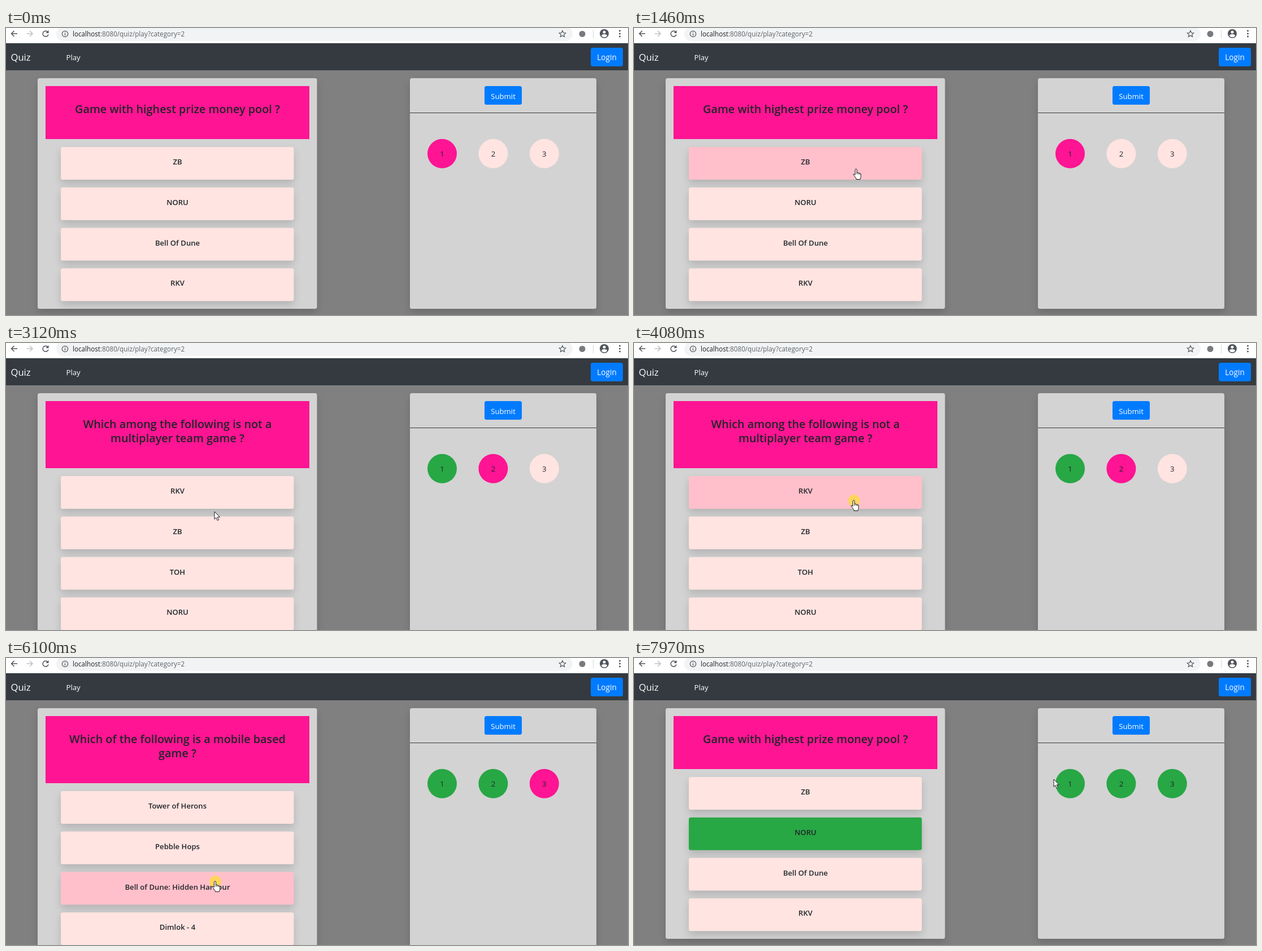
An HTML page that plays this animation: 1101 px wide and 509 px high, repeating every 8000 ms.

```html
<!DOCTYPE html>
<html lang="en">
<head>
<meta charset="utf-8">
<title>Quiz</title>
<style>
  html, body { margin: 0; width: 100%; height: 100%; overflow: hidden; background: #808080; }
  svg { display: block; width: 1101px; height: 509px; font-family: "Open Sans", "Noto Sans", sans-serif; }
  text { fill: #212529; font-size: 13.2px; }
  .mid { text-anchor: middle; }
  .light { fill: #fff; }
  .card { fill: #d3d3d3; }
  .shadow { filter: drop-shadow(0 7px 7px rgba(0, 0, 0, .15)); }
  .title { font-size: 19.8px; font-weight: 600; }
  .label { font-size: 13.1px; font-weight: 600; }
  .url { font-size: 11.7px; fill: #5f6368; }
  .line { fill: none; stroke: #50545a; stroke-width: 1.5; }
  .pointer { fill: #fff; stroke: #1a1a1a; stroke-width: 1; stroke-linejoin: round; }
</style>
</head>
<body>
<svg viewBox="0 0 1101 509">
  <rect width="1101" height="509" fill="#808080"/>

  <!-- browser bar -->
  <rect width="1101" height="27" fill="#fff"/>
  <rect x="89" y="-2" width="914" height="25" rx="12.5" fill="#f1f3f4"/>
  <path class="line" d="M20 10H9.5M14.5 5l-5 5 5 5"/>
  <path class="line" style="stroke:#bdc1c6" d="M36.5 10H47M42 5l5 5-5 5"/>
  <path class="line" d="M74 7A5 5 0 1 0 75 11.5"/>
  <path fill="#50545a" d="M75.5 4v5h-5z"/>
  <g class="line" style="stroke-width:1.2">
    <circle cx="104.5" cy="10.5" r="5.2"/>
    <path d="M104.5 9.8v3.6M104.5 7.4v1.3"/>
    <path d="M985 4.8l1.7 3.7 4 .4-3 2.7.9 4-3.6-2.1-3.6 2.1.9-4-3-2.7 4-.4z"/>
  </g>
  <text class="url" x="118" y="15"><tspan fill="#202124">localhost</tspan>:8080/quiz/play?category=2</text>
  <circle cx="1020" cy="10.5" r="5.5" fill="#777a7e"/>
  <path d="M1039.5 3v15" stroke="#d5d7da"/>
  <circle cx="1059" cy="10" r="8" fill="#50545a"/>
  <circle cx="1059" cy="7.3" r="2.5" fill="#fff"/>
  <path d="M1054 14q0-3 5-3t5 3q-2 2.5-5 2.5t-5-2.5z" fill="#fff"/>
  <g fill="#50545a">
    <circle cx="1086.5" cy="5" r="1.5"/><circle cx="1086.5" cy="10" r="1.5"/><circle cx="1086.5" cy="15" r="1.5"/>
  </g>

  <!-- navigation -->
  <rect y="27" width="1101" height="48" fill="#343a40"/>
  <text class="light" x="8.5" y="57.5" style="font-size:16.6px">Quiz</text>
  <text class="light" x="106.5" y="56.5">Play</text>
  <rect x="1035" y="35" width="57" height="33" rx="3.5" fill="#007bff"/>
  <text class="light mid" x="1063.5" y="56.5" style="font-size:13.6px">Login</text>

  <!-- cards -->
  <rect class="card shadow" x="56" y="89" width="494.5" height="409" rx="3.5"/>
  <rect class="card shadow" x="715" y="89" width="330" height="409" rx="3.5"/>
  <rect id="banner" x="70" y="103" width="467" height="94" fill="#ff1493"/>
  <text class="title mid" x="303.5" y="151"></text>
  <text class="title mid" x="303.5" y="176"></text>
  <g id="rows"></g>

  <rect x="847" y="103" width="66" height="33" rx="3.5" fill="#007bff"/>
  <text class="light mid" x="880" y="125.5">Submit</text>
  <path d="M715 150.5h330" stroke="#343a40"/>
  <g id="dots"></g>

  <!-- mouse -->
  <g id="mouse">
    <circle id="press" cx=".5" cy=".5" r="10.5" fill="#ffd84a" opacity=".85"/>
    <path id="arrow" class="pointer" d="M0 0v13.5l3-2.8 2.2 5 2.3-1-2.2-4.9h4.2z"/>
    <g id="hand" class="pointer">
      <path d="M-1.5 1.5a1.5 1.5 0 0 1 3 0V6.3q2.4-.6 2.6.9 2.2-.6 2.5.8 2-.4 2 1.4v4.1q0 2-1.2 3.5v1.5h-7v-1.5q-1.3-1.4-2.4-3.4-.7-1.4-2.2-2.6-1.1-1.3 0-1.9 1.2-.5 2.7 1.5z"/>
      <path fill="none" d="M1.5 6.3v3m2.6-2v2.4m2.5-1.6v2"/>
    </g>
  </g>
</svg>
<script>
const LOOP = 8000, PITCH = 71.75, ROW_H = 58;
const ROSE = '#ffe4e1', PINK = '#ffc0cb', DEEP = '#ff1493', GREEN = '#28a745';

const quiz = [
  { title: ['Game with highest prize money pool ?', ''],
    rows: ['ZB', 'NORU', 'Bell Of Dune', 'RKV'] },
  { title: ['Which among the following is not a', 'multiplayer team game ?'],
    rows: ['RKV', 'ZB', 'TOH', 'NORU'] },
  { title: ['Which of the following is a mobile based', 'game ?'],
    rows: ['Tower of Herons', 'Pebble Hops', 'Bell of Dune: Hidden Harbour', 'Dimlok - 4'] }
];

// [time, question shown, questions answered]
const stages = [[0, 0, 0], [2670, 1, 1], [4320, 2, 2], [6330, 0, 3]];
const presses = [[2350, 2590], [4080, 4320], [6100, 6330]];

// [start, end, steps, x, y]: each move goes from the previous point to x, y
const moves = [
  [280, 280, 1, 763, 486],
  [360, 1080, 10, 397, 262],
  [1150, 1460, 5, 393, 250],
  [1870, 2180, 5, 366, 302],
  [3050, 3830, 11, 389, 279],
  [4870, 5240, 6, 374, 366],
  [5320, 5620, 5, 370, 387],
  [5700, 5850, 3, 370, 396],
  [6820, 6820, 1, 465, 338],
  [6880, 7270, 6, 708, 214],
  [7350, 7580, 4, 665, 212],
  [7660, 7970, 5, 743, 215]
];

const $ = id => document.getElementById(id);
const show = (el, on) => el.setAttribute('visibility', on ? 'visible' : 'hidden');
const within = (t, [a, b]) => t >= a && t < b;

function add(parent, tag, attrs) {
  const el = document.createElementNS('http://www.w3.org/2000/svg', tag);
  for (const key in attrs) el.setAttribute(key, attrs[key]);
  return parent.appendChild(el);
}

const titles = document.querySelectorAll('.title');
const cards = document.querySelectorAll('.card');
const rows = [0, 1, 2, 3].map(i => ({
  box: add($('rows'), 'rect', { class: 'shadow', x: 97, y: 211 + i * PITCH, width: 412.5, height: ROW_H, rx: 3.5 }),
  text: add($('rows'), 'text', { class: 'label mid', x: 303.5, y: 242 + i * PITCH })
}));
const dots = [0, 1, 2].map(i => {
  const x = 772 + i * 90.4;
  const dot = add($('dots'), 'circle', { cx: x, cy: 222.8, r: 26 });
  add($('dots'), 'text', { class: 'mid', x, y: 228 }).textContent = i + 1;
  return dot;
});

function pointAt(t) {
  let x = moves[0][3], y = moves[0][4];
  for (const [start, end, steps, toX, toY] of moves) {
    if (t < start) break;
    const gap = (end - start) / (steps - 1 || 1) || 1;
    const step = Math.min(steps, Math.floor((t - start) / gap + .01) + 1);
    const p = 1 - (1 - step / steps) ** 1.6;
    x += (toX - x) * p;
    y += (toY - y) * p;
  }
  return [x, y];
}

let shown = -1;
function layout(q) {
  if (q === shown) return;
  shown = q;
  const shift = quiz[q].title[1] ? 25 : 0;
  titles.forEach((el, i) => el.textContent = quiz[q].title[i]);
  rows.forEach((row, i) => row.text.textContent = quiz[q].rows[i]);
  cards.forEach(card => card.setAttribute('height', 409 + shift));
  $('banner').setAttribute('height', 94 + shift);
  $('rows').setAttribute('transform', `translate(0 ${shift})`);
}

function draw() {
  const t = performance.now() % LOOP;
  const [, q, done] = stages.filter(s => t >= s[0]).pop();
  const [x, y] = pointAt(t);
  const visible = t >= moves[0][0];
  layout(q);

  const top = quiz[q].title[1] ? 236 : 211;
  let over = false;
  rows.forEach((row, i) => {
    const dy = y - top - i * PITCH;
    const hit = visible && x >= 97 && x < 509.5 && dy >= 0 && dy < ROW_H;
    const picked = done === 3 && i === 1;
    row.box.setAttribute('fill', picked ? GREEN : hit ? PINK : ROSE);
    over = over || hit;
  });
  dots.forEach((dot, i) => dot.setAttribute('fill', i < done ? GREEN : i === q ? DEEP : ROSE));

  const hand = over && !within(t, [2590, 2670]);
  show($('hand'), visible && hand);
  show($('arrow'), visible && !hand);
  show($('press'), presses.some(p => within(t, p)));
  $('mouse').setAttribute('transform', `translate(${Math.round(x)} ${Math.round(y)})`);
  requestAnimationFrame(draw);
}
draw();
</script>
</body>
</html>
```
